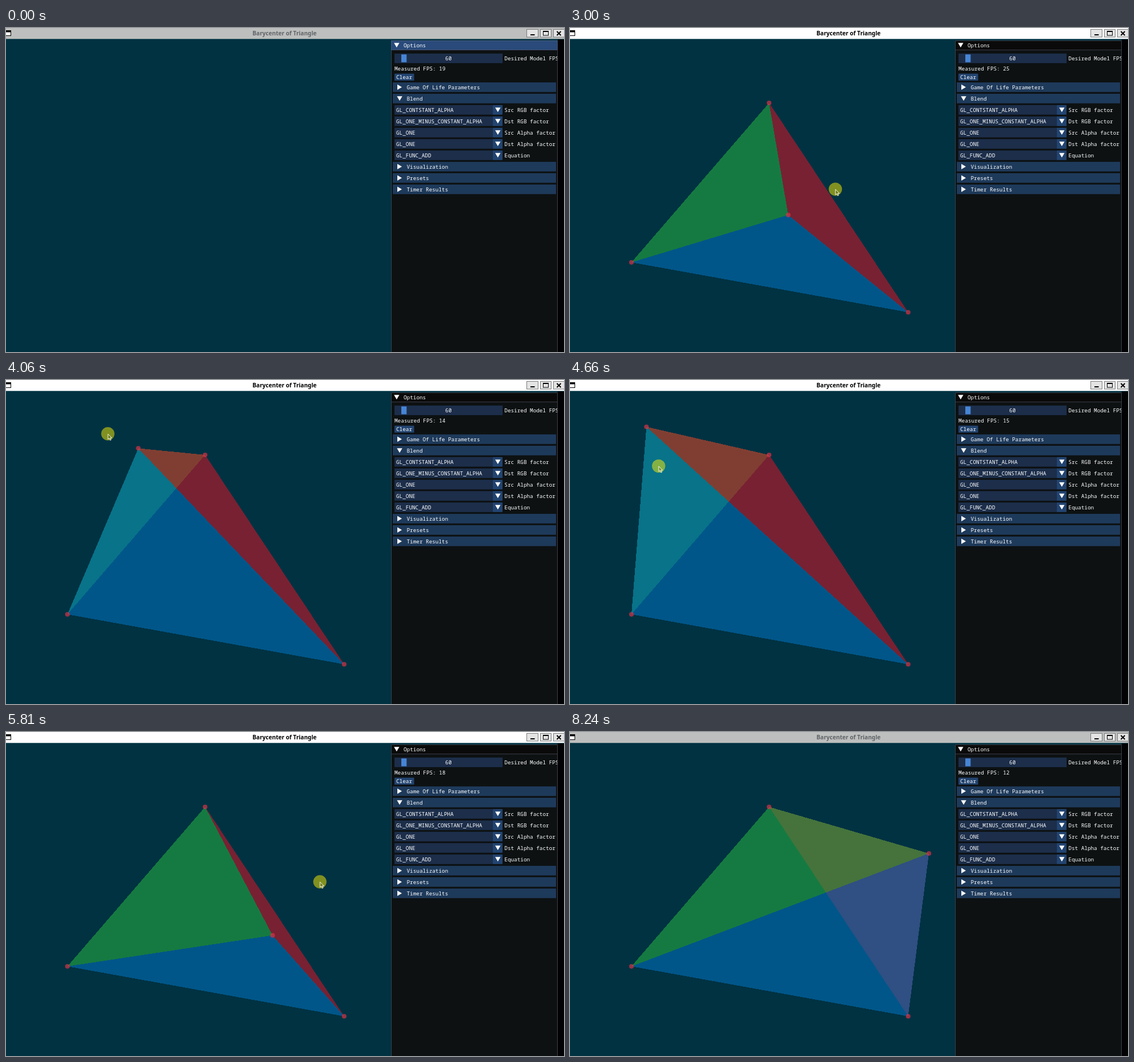
These frames come from a looping animation (981 by 571 pixels, 8.3 s). An HTML page:

```html
<!DOCTYPE html>
<html lang="en">
<head>
<meta charset="utf-8">
<title>Barycenter of Triangle</title>
<style>
  html, body { margin: 0; width: 100%; height: 100%; overflow: hidden; background: #003242; }
  svg { display: block; }
  text { white-space: pre; }
  #panel text { font: 9.33px "Noto Sans Mono", "DejaVu Sans Mono", monospace; fill: #fff; }
  #title { font: bold 10.15px "Noto Sans", "Open Sans", sans-serif; text-anchor: middle; }
  .frame { fill: #1c2e4a; }
  .grab { fill: #4784d4; }
  .button { fill: #224470; }
  .header { fill: #1e3a5b; }
  .mark { fill: #fff; }
  #faces { shape-rendering: crispEdges; }
  #faces polygon { fill-opacity: .6; }
  #dots circle { fill: #dc3246; fill-opacity: .68; }
</style>
</head>
<body>
<svg width="981" height="571" viewBox="0 0 981 571">
  <defs>
    <clipPath id="inside"><rect x="677" y="22" width="292.5" height="549"/></clipPath>
  </defs>
  <rect width="981" height="571" fill="#003242"/>

  <g id="faces">
    <polygon fill="#23aa42"/>
    <polygon fill="#c81729"/>
    <polygon fill="#006eba"/>
  </g>
  <g id="dots"></g>

  <rect x="970" y="20" width="11" height="551" fill="#000203"/>
  <rect x="677" y="22" width="293" height="549" fill="#0d1112"/>
  <g id="panel" clip-path="url(#inside)">
    <rect id="options" x="677" y="22" width="293" height="16.9"/>
  </g>
  <path d="M677.5 571V22.5H969.5V571M678 38.7H969" fill="none" stroke="#6e6e80" stroke-opacity=".5"/>

  <rect id="bar" width="981" height="19.3"/>
  <text id="title" x="489.7" y="13">Barycenter of Triangle</text>
  <g stroke="#000" fill="#fff">
    <rect x="-1.5" y="4.5" width="10" height="9"/>
    <path d="M-1 6H9" stroke-width="3"/>
  </g>
  <g fill="#e4e4e4" stroke="#77797a">
    <rect x="915.5" y="2.5" width="20" height="13.5"/>
    <rect x="939.5" y="2.5" width="19" height="13.5"/>
    <rect x="962.5" y="2.5" width="20" height="13.5"/>
  </g>
  <g fill="none" stroke="#000">
    <path d="M922 12H929.5" stroke-width="2"/>
    <rect x="944.5" y="5.5" width="9" height="7.5"/>
    <path d="M944 6H954" stroke-width="2"/>
    <path d="M968.5 6L975.5 13M975.5 6L968.5 13" stroke-width="2"/>
  </g>

  <g id="mouse">
    <circle id="press" cx=".3" r="11.7" fill="#fff000" fill-opacity=".5"/>
    <path d="M.5 .3V9.8L2.8 7.8L4.4 11.6L6 10.9L4.4 7.3H7.3Z"
          fill="#000" fill-opacity=".15" stroke="#fff" stroke-width=".9"/>
  </g>
</svg>

<script>
const LOOP = 8300, LAG = 80;
const $ = id => document.getElementById(id);

function add(parent, tag, attrs, text) {
  const el = document.createElementNS("http://www.w3.org/2000/svg", tag);
  for (const key in attrs) el.setAttribute(key, attrs[key]);
  if (text) el.textContent = text;
  parent.appendChild(el);
  return el;
}

// Panel: rows sit on a fixed pitch, each drawn around its middle line
const panel = $("panel"), ROW = 16.9, PITCH = 20, FIRST = 104.3;
const box = (cls, x, mid, width, height = ROW) =>
  add(panel, "rect", { class: cls, x, y: mid - height / 2, width, height });
const label = (x, mid, text) => add(panel, "text", { x, y: mid + 3.3 }, text);
const mark = d => add(panel, "path", { class: "mark", d });
const arrowDown = (x, mid) => mark(`M${x - 4.7} ${mid - 4}h9.4l-4.7 8z`);
const arrowRight = (x, mid) => mark(`M${x - 4} ${mid - 4.7}v9.4l8 -4.7z`);

function header(mid, text) {
  box("header", 680, mid, 287);
  (text === "Blend" ? arrowDown : arrowRight)(692, mid);
  label(704.5, mid, text);
}

function combo(mid, value, name) {
  box("frame", 683, mid, 173);
  box("button", 856, mid, ROW);
  arrowDown(864.7, mid);
  label(686, mid, value);
  label(876.3, mid, name);
}

arrowDown(686.8, 30.3);
label(699, 30.4, "Options");
box("frame", 683, 53.5, 190);
box("grab", 695, 53.5, 9.3, 13.8);
label(772.3, 53.5, "60");
label(876.3, 53.5, "Desired Model FPS");
const fps = label(683, 71.4, "");
box("button", 683, 86.6, 34.5, 12.3);
label(686, 86.6, "Clear");
[
  ["Game Of Life Parameters"],
  ["Blend"],
  ["GL_CONTSTANT_ALPHA", "Src RGB factor"],
  ["GL_ONE_MINUS_CONSTANT_ALPHA", "Dst RGB factor"],
  ["GL_ONE", "Src Alpha factor"],
  ["GL_ONE", "Dst Alpha factor"],
  ["GL_FUNC_ADD", "Equation"],
  ["Visualization"],
  ["Presets"],
  ["Timer Results"]
].forEach(([text, name], i) => (name ? combo : header)(FIRST + i * PITCH, text, name));

// Mouse stops: x, y, arrival and departure time
const stop = (x, y, from, to) => ({ x, y, from, to });
const pass = (x, y, at) => stop(x, y, at, at);
const corners = [
  stop(108, 413, 720, 920), stop(350, 132, 1320, 1440), stop(594.5, 501, 1900, 2080)
];
const grab = stop(381, 331, 2520, 2910), drop = stop(631, 214, 6700, 6950);
const path = [
  pass(770, 395, 70), corners[0], corners[1], pass(530.5, 489, 1730), corners[2],
  grab, pass(465.5, 284.5, 3000), stop(672, 163, 3320, 3530),
  pass(233.5, 120.5, 3980), pass(179, 95, 4060), stop(123, 46, 4370, 4480),
  pass(241, 455, 4930), pass(237.5, 529, 5010), stop(222, 560, 5190, 5290),
  pass(468, 359, 5730), pass(551, 264.5, 5810), pass(660, 165, 6090),
  drop, pass(773, 411, 7480)
];
const clicks = [...corners, grab];

function slope(i, k) {
  const a = path[i - 1], b = path[i], c = path[i + 1];
  return !a || !c || b.from < b.to ? 0 : (c[k] - a[k]) / (c.from - a.to);
}

// Cubic Hermite between stops
function mouseAt(t) {
  let i = path.findLastIndex(p => p.from <= t);
  if (i < 0) i = 0;
  const a = path[i], b = path[i + 1];
  if (!b || t <= a.to) return [a.x, a.y];
  const span = b.from - a.to, u = (t - a.to) / span, s = u * u * (3 - 2 * u);
  return ["x", "y"].map(k => a[k] + (b[k] - a[k]) * s
    + span * u * (1 - u) * ((1 - u) * slope(i, k) - u * slope(i + 1, k)));
}

// Frame rate drifts between a few readings
const rates = [[0, 19], [1730, 20], [3000, 25], [4060, 14], [5810, 18], [8200, 12]];
function rateAt(t) {
  const i = rates.findLastIndex(r => r[0] <= t), a = rates[i], b = rates[i + 1] || [LOOP, a[1]];
  return Math.round(a[1] + (b[1] - a[1]) * (t - a[0]) / (b[0] - a[0]));
}

const dots = clicks.map(() => add($("dots"), "circle", { r: 4.1 }));
const faces = [...$("faces").children];
const show = (el, on) => el.setAttribute("visibility", on ? "visible" : "hidden");
const placed = (click, t) => t >= click.from + 140;
const cross = (a, b, [x, y]) => (b.x - a.x) * (y - a.y) - (b.y - a.y) * (x - a.x);

function draw(t) {
  const focused = t >= 760 && t < 8080;
  $("bar").setAttribute("fill", focused ? "#fff" : "#bdbfbe");
  $("title").setAttribute("fill", focused ? "#000" : "#606366");
  $("options").setAttribute("fill", t < 920 ? "#294a7a" : "#0a0a0a");
  fps.textContent = "Measured FPS: " + rateAt(t);

  const free = mouseAt(Math.min(Math.max(t - LAG, grab.from), drop.to));
  [...corners.map(c => [c.x, c.y]), free].forEach(([x, y], i) => {
    dots[i].setAttribute("cx", x);
    dots[i].setAttribute("cy", y);
    show(dots[i], placed(clicks[i], t));
  });

  show($("faces"), placed(grab, t));
  faces.forEach((face, i) => {
    const a = corners[i], b = corners[(i + 1) % 3];
    face.setAttribute("points", [a.x, a.y, b.x, b.y, ...free].join(" "));
    // a flipped face lies below the others
    if (cross(a, b, free) < 0) $("faces").prepend(face);
  });

  const [x, y] = mouseAt(t);
  $("mouse").setAttribute("transform", `translate(${x} ${y})`);
  $("mouse").style.display = t >= 70 && t < 7550 ? "" : "none";
  const clicking = corners.some(c => t >= c.from + 40 && t < c.to);
  show($("press"), clicking || t >= grab.from + 40 && t < drop.to);
}

const start = performance.now();
function tick() {
  draw((performance.now() - start) % LOOP);
  requestAnimationFrame(tick);
}
tick();
</script>
</body>
</html>
```
